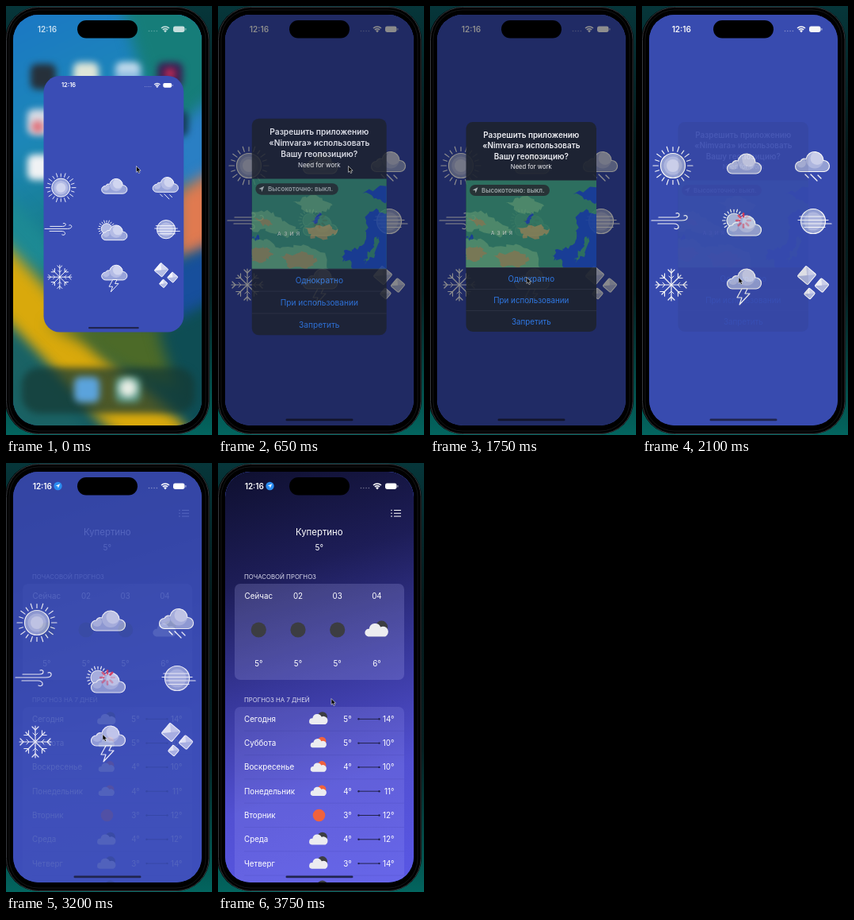
An HTML page with a canvas that plays this animation: 260 by 540 pixels, repeating every 3800 ms.

```html
<!DOCTYPE html>
<html lang="ru">
<head>
<meta charset="utf-8">
<style>
  html, body { margin: 0; width: 260px; height: 540px; overflow: hidden; background: #000; }
  canvas { display: block; }
</style>
</head>
<body>
<canvas id="stage" width="260" height="540"></canvas>
<script>
const LOOP = 3800;
const canvas = document.getElementById('stage');
const buffer = document.createElement('canvas');
buffer.width = canvas.width;
buffer.height = canvas.height;
const main = canvas.getContext('2d');
const off = buffer.getContext('2d');
let g = main;

const clamp = v => Math.min(1, Math.max(0, v));
const mix = (a, b, p) => a + (b - a) * p;
const span = (t, a, b) => clamp((t - a) / (b - a));
const smooth = p => p * p * (3 - 2 * p);
const settle = (t, start, tau) => t < start ? 0 : 1 - Math.exp((start - t) / tau);

function box(x, y, w, h, r, fill) {
  g.beginPath();
  g.roundRect(x, y, w, h, r);
  if (fill) { g.fillStyle = fill; g.fill(); }
}
function disc(x, y, r, fill, stroke, width = 1.2) {
  g.beginPath();
  g.arc(x, y, r, 0, Math.PI * 2);
  if (fill) { g.fillStyle = fill; g.fill(); }
  if (stroke) { g.strokeStyle = stroke; g.lineWidth = width; g.stroke(); }
}
function line(x1, y1, x2, y2, color = '#fff', width = 1.2) {
  g.beginPath();
  g.moveTo(x1, y1);
  g.lineTo(x2, y2);
  g.strokeStyle = color;
  g.lineWidth = width;
  g.stroke();
}
function shape(d, fill, stroke, width = 1.2) {
  const path = new Path2D(d);
  if (fill) { g.fillStyle = fill; g.fill(path); }
  if (stroke) { g.strokeStyle = stroke; g.lineWidth = width; g.stroke(path); }
}
function text(str, x, y, size, { color = '#fff', weight = 400, align = 'center' } = {}) {
  g.font = `${weight} ${size}px Inter, "Noto Sans", sans-serif`;
  g.textAlign = align;
  g.textBaseline = 'alphabetic';
  g.fillStyle = color;
  g.fillText(str, x, y + size * 0.36);
}
function at(x, y, draw, scale = 1) {
  g.save();
  g.translate(x, y);
  g.scale(scale, scale);
  draw();
  g.restore();
}
function gradient(x1, y1, x2, y2, ...colors) {
  const fill = g.createLinearGradient(x1, y1, x2, y2);
  colors.forEach((c, i) => fill.addColorStop(i / (colors.length - 1), c));
  return fill;
}
// Draws a group on its own surface, then blends it as one.
function layer(alpha, draw) {
  if (alpha < 0.004) return;
  off.clearRect(0, 0, 260, 540);
  g = off;
  draw();
  g = main;
  g.save();
  g.globalAlpha = alpha;
  g.drawImage(buffer, 0, 0);
  g.restore();
}

// ---- Home screen ----

function wallpaper() {
  g.save();
  g.filter = 'blur(9px)';
  box(-20, -20, 300, 590, 0, gradient(40, 0, 230, 400, '#1b78c4', '#1c87b8', '#167a80', '#0f5560'));
  shape('M140 -20H290V180H200Z', '#167d79');
  shape('M205 160L290 90V215L215 230Z', '#2a7fc4');
  shape('M215 235L290 190V300L215 320Z', '#e07a50');
  shape('M200 330L290 285V350L210 420Z', '#174f9c');
  shape('M-20 215L60 300 60 340 -20 300Z', '#1d8a94');
  shape('M-20 280Q50 350 90 400T270 560H160Q70 480 -20 375Z', '#d9a90c');
  shape('M50 400H215L250 480Q160 480 100 425Z', '#4c6a28');
  shape('M-20 385Q40 440 90 500L120 580H-20Z', '#1a6264');
  shape('M190 405L290 360V580L230 530Z', '#0e4d54');
  g.restore();

  g.save();
  g.filter = 'blur(4px)';
  const app = (x, y, fill) => box(x - 16, y - 16, 32, 32, 8, fill);
  app(47, 89, '#26303a');
  app(101, 87, '#dfe6d8');
  app(154, 87, gradient(0, 70, 0, 104, '#e8f0f4', '#3f8fd0'));
  app(207, 87, '#3a1f55');
  disc(207, 85, 7, '#c02a55');
  app(43, 146, '#d8dde6');
  disc(40, 152, 8, '#e07078');
  app(43, 203, '#f0f2f4');
  app(214, 148, '#153a58');
  box(20, 455, 218, 58, 22, 'rgba(22,58,52,.72)');
  app(102, 483, '#5ba3dc');
  app(154, 483, '#5d9a8a');
  disc(154, 481, 11, '#e6ede4');
  g.restore();
}

// ---- Sky glyphs ----

const PALE = '#d0d5f0', MID = '#98a4da', SOFT = '#b4bce5';
const CLOUD = 'M-15 13A6.5 6.5 0 0 1 -15 0A6 6 0 0 1 -8 -3A11.1 11.1 0 0 1 14 -1A7 7 0 0 1 15 13Z';

function cloud(x, y) {
  at(x, y, () => {
    shape(CLOUD, MID);
    g.save();
    g.clip(new Path2D(CLOUD));
    disc(3, -2, 11, SOFT);
    disc(6, -4, 8.5, PALE);
    disc(-14, 2, 6, SOFT);
    g.restore();
    shape(CLOUD, null, '#fff');
  });
}
function rays(x, y, inner, outer, count) {
  for (let i = 0; i < count; i++) {
    const a = i / count * Math.PI * 2, r = i % 2 ? outer - (outer - inner) * 0.25 : outer;
    line(x + Math.cos(a) * inner, y + Math.sin(a) * inner, x + Math.cos(a) * r, y + Math.sin(a) * r);
  }
}
function gem(x, y, r) {
  at(x, y, () => {
    g.rotate(Math.PI / 4 - 0.08);
    const s = r * 1.36;
    box(-s / 2, -s / 2, s, s, 1.6, PALE);
    shape(`M${-s / 2} ${s / 2}L${s / 2} ${-s / 2}V${s / 2}Z`, SOFT);
    shape(`M${-s / 2} ${-s / 2}L0 0L${-s / 2} ${s / 2}Z`, '#f4f5fc');
    box(-s / 2, -s / 2, s, s, 1.6);
    g.strokeStyle = '#fff';
    g.lineWidth = 1;
    g.stroke();
  });
}
function snowflake(x, y) {
  for (let i = 0; i < 8; i++) {
    at(x, y, () => {
      g.rotate(i * Math.PI / 4);
      const r = i % 2 ? 17 : 20;
      line(0, 0, r, 0);
      shape(`M${r - 1} -4L${r - 5} 0L${r - 1} 4`, null, '#fff');
      if (i % 2 === 0) shape('M11 -3L8 0L11 3', null, '#fff', 1);
    });
  }
}
function glyphs() {
  g.lineCap = g.lineJoin = 'round';
  rays(39, 201, 18.5, 25, 20);
  disc(39, 201, 15.5, MID, '#fff');
  disc(39, 201, 11.5, SOFT);
  disc(39, 201, 8, PALE);

  cloud(129, 198);
  cloud(215, 195.5);
  line(206, 212, 210, 216);
  line(213, 212, 221, 220);
  line(222, 213, 226, 217);

  shape('M12 270H50C60 270 58 262 53 264', null, '#fff');
  shape('M21 266H42C49 266 48 259 43 261', null, '#fff');
  shape('M20 274H40C49 274 47 283 41 280', null, '#fff');

  rays(116, 270, 11, 14.5, 20);
  disc(116, 270, 9, SOFT, '#fff');
  cloud(129, 276);

  disc(216, 271, 15.5, MID, '#fff');
  disc(216, 271, 11.5, SOFT);
  line(199, 265, 230, 265);
  line(197, 269.5, 235, 269.5);
  line(202, 274, 239, 274);
  line(205, 278.5, 231, 278.5);

  snowflake(37, 351);
  cloud(129, 343);
  shape('M126 356L120 367H126L123 376L136 362H130L133 356Z', '#3a4db5', '#fff');

  gem(208, 339, 12.5);
  gem(227, 351.5, 9.5);
  gem(211.5, 362, 7.5);
}
function spinner(t) {
  const head = t / 1000 * 8;
  for (let i = 0; i < 8; i++) {
    const age = (((head - i) % 8) + 8) % 8;
    const a = i * Math.PI / 4 - Math.PI / 2;
    line(128 + Math.cos(a) * 5, 270 + Math.sin(a) * 5, 128 + Math.cos(a) * 8.8, 270 + Math.sin(a) * 8.8,
      `rgba(232,56,84,${1 - age * 0.1})`, 2.6);
  }
}

// ---- System chrome ----

function status(t) {
  const shift = smooth(span(t, 2000, 2250));
  text('12:16', mix(52, 45.8, shift), 29, 10, { weight: 600 });
  const pin = smooth(span(t, 2100, 2300));
  if (pin) {
    g.save();
    g.globalAlpha *= pin;
    disc(65.5, 29, 5.2, '#2a8cf0');
    shape('M68.2 26.3L62.8 28.8L65.3 29.2L65.8 31.8Z', '#fff');
    g.restore();
  }
  for (let i = 0; i < 4; i++) disc(180.5 + i * 3.3, 31.5, 0.8, 'rgba(255,255,255,.4)');
  g.lineCap = 'butt';
  for (const r of [7, 4.4]) {
    g.beginPath();
    g.arc(201, 33, r, -Math.PI * 0.75, -Math.PI * 0.25);
    g.strokeStyle = '#fff';
    g.lineWidth = 1.6;
    g.stroke();
  }
  shape('M201 33.5L199 31Q201 29.6 203 31Z', '#fff');
  box(211, 25.5, 14.5, 7.5, 2.4, '#fff');
  box(226.3, 28, 1.2, 2.6, 0.6, 'rgba(255,255,255,.6)');
}
function device() {
  g.fillStyle = gradient(0, 0, 0, 540, '#06363a', '#04191b', '#052022', '#03655f');
  g.fillRect(0, 0, 260, 540);
  box(-1, 1, 258, 538, 42, '#000');
  box(0.5, 1.5, 255.5, 537, 41);
  g.strokeStyle = '#35383d';
  g.lineWidth = 1;
  g.stroke();
  box(4, 5, 248, 530, 37);
  g.strokeStyle = '#141517';
  g.stroke();
}
function cursor(t) {
  const stops = [[0, 164.5, 201.5], [680, 164.5, 201.5], [1100, 146, 341], [1225, 112, 341],
    [1350, 122, 341.5], [3350, 122, 341.5], [3700, 143, 296.5], [LOOP, 143, 296.5]];
  const i = stops.findIndex(s => s[0] > t);
  const [t0, x0, y0] = stops[i - 1], [t1, x1, y1] = stops[i];
  const p = smooth(span(t, t0, t1));
  at(mix(x0, x1, p), mix(y0, y1, p), () =>
    shape('M0 0V7.8L1.8 6.2L3 9L4.5 8.3L3.3 5.7H5.6Z', '#000', 'rgba(255,255,255,.8)', 0.7));
}

// ---- Permission alert ----

function coast(points, fill, seed) {
  const random = () => (seed = seed * 16807 % 2147483647) / 2147483647 - 0.5;
  g.beginPath();
  points.forEach(([x, y], i) => {
    const [nx, ny] = points[(i + 1) % points.length];
    for (let k = 0; k < 6; k++) g.lineTo(mix(x, nx, k / 6) + random() * 5, mix(y, ny, k / 6) + random() * 5);
  });
  g.closePath();
  g.fillStyle = fill;
  g.fill();
}
function map() {
  const sea = '#193f9b', sand = '#817f55', light = '#52906b';
  g.save();
  g.beginPath();
  g.rect(45.5, 219.5, 164.5, 109.5);
  g.clip();
  g.fillStyle = '#2f765f';
  g.fillRect(45, 219, 166, 111);
  coast([[40, 262], [66, 258], [84, 270], [104, 282], [86, 290], [60, 280], [42, 284]], light, 11);
  coast([[40, 296], [62, 292], [80, 306], [108, 300], [136, 312], [140, 335], [40, 335]], light, 23);
  coast([[98, 246], [122, 240], [145, 252], [130, 262], [108, 258]], light, 37);
  coast([[44, 306], [60, 302], [72, 312], [60, 320], [46, 320]], sand, 5);
  coast([[82, 314], [104, 308], [126, 318], [116, 328], [90, 327]], sand, 19);
  coast([[112, 280], [138, 275], [152, 284], [136, 292], [118, 290]], sand, 71);
  coast([[50, 268], [60, 266], [70, 274], [58, 277]], sand, 47);
  coast([[183, 236], [215, 226], [215, 250], [200, 244]], sea, 59);
  coast([[186, 264], [198, 256], [215, 268], [215, 335], [166, 335], [168, 322], [154, 318], [160, 308],
    [176, 304], [186, 290]], sea, 83);
  coast([[196, 290], [202, 294], [196, 312], [184, 322], [182, 318], [192, 306]], '#2f765f', 29);
  coast([[120, 270], [127, 262], [129, 264], [122, 273]], sea, 91);
  coast([[47, 290], [53, 288], [52, 294]], sea, 13);
  'АЗИЯ'.split('').forEach((c, i) => text(c, 79 + i * 7.6, 286, 6.5, { color: '#c0cbbd', weight: 500 }));
  g.restore();
}
function alertCard() {
  box(45.5, 146, 164.5, 264, 8.5, '#1e232f');
  ['Разрешить приложению', '«Nimvara» использовать', 'Вашу геопозицию?'].forEach((s, i) =>
    text(s, 127.8, 162.3 + i * 13.4, 9.9, { weight: 600 }));
  text('Need for work', 127.8, 202.5, 7.7);
  map();
  box(50, 225, 101, 14, 7, '#293532');
  shape('M60.5 228.3L53.8 231.6L57 232.2L57.6 235.4Z', '#b6bebb');
  text('Высокоточно: выкл.', 65, 232, 7.9, { weight: 600, color: '#aab3b0', align: 'left' });
  ['Однократно', 'При использовании', 'Запретить'].forEach((s, i) => {
    line(45.5, 329.5 + i * 27, 210, 329.5 + i * 27, '#363b48', 0.6);
    text(s, 127.8, 343 + i * 27, 9.8, { color: '#317fee' });
  });
}

// ---- Forecast ----

const NIGHT = '#3c3d42', SUN = '#f0623d';

function miniCloud(x, y, behind, scale) {
  at(x, y, () => {
    disc(5, -3, 6.5, behind);
    shape('M-9 7A4 4 0 0 1 -8 -1A6.3 6.3 0 0 1 4 -3A5 5 0 0 1 9 7Z', '#ececf0');
  }, scale);
}
function forecast() {
  box(9, 11, 238, 517, 0, gradient(50, 0, 210, 530, '#0f1030', '#1d1d57', '#37379a', '#5250d2', '#5957e4'));
  for (let i = 0; i < 3; i++) {
    const y = 59.5 + i * 3.8;
    disc(219, y, 0.8, '#fff');
    line(222, y, 231, y, '#fff', 1);
  }
  text('Купертино', 127.8, 87, 11.4);
  text('5°', 127.8, 106, 10);
  const label = { color: '#dcdcee', align: 'left' };
  text('ПОЧАСОВОЙ ПРОГНОЗ', 33, 143, 7.8, label);
  text('ПРОГНОЗ НА 7 ДНЕЙ', 33, 298, 7.8, label);

  box(21, 152, 214, 121, 7, 'rgba(190,190,255,.2)');
  [['Сейчас', 5], ['02', 5], ['03', 5], ['04', 6]].forEach(([hour, temp], i) => {
    const x = 51.3 + i * 49.7;
    text(hour, x, 167.5, 9.8);
    if (i < 3) disc(x, 210, 9.6, NIGHT);
    else miniCloud(x, 210, NIGHT, 1.2);
    text(temp + '°', x, 252, 9.8);
  });

  box(21, 307, 214, 260, 7, 'rgba(170,170,255,.17)');
  const days = [['Сегодня', 5, 14, NIGHT], ['Суббота', 5, 10, SUN], ['Воскресенье', 4, 10, SUN],
    ['Понедельник', 4, 11, SUN], ['Вторник', 3, 12, 'clear'], ['Среда', 4, 12, NIGHT],
    ['Четверг', 3, 14, NIGHT]];
  days.forEach(([day, low, high, sky], i) => {
    const y = 322.3 + i * 30.3;
    text(day, 33, y, 9.8, { align: 'left' });
    if (sky === 'clear') disc(127.5, y, 7.8, SUN);
    else miniCloud(127, y, sky, sky === SUN ? 0.82 : 0.95);
    text(low + '°', 163.5, y, 9.8);
    line(177.5, y, 203.5, y, '#22224c', 1);
    disc(177.5, y, 1.2, '#22224c');
    disc(203.5, y, 1.2, '#22224c');
    text(high + '°', 222.5, y, 9.8, { align: 'right' });
    line(33, y + 15, 235, y + 15, 'rgba(30,30,110,.2)', 0.5);
  });
  miniCloud(127, 534.5, NIGHT, 0.95);
}

// ---- Scene ----

function appWindow(t) {
  const p = t > 500 ? 1 : 1 - Math.exp(-t / 80);
  const left = mix(48, 9, p), right = mix(224, 247, p), top = mix(89, 11, p), bottom = mix(409, 528, p);
  const s = mix(0.747, 1, p);
  const scaled = draw => at(mix(136, 127.8, p), mix(229, 201, p), () => {
    g.translate(-127.8, -201);
    draw();
  }, s);
  g.save();
  box(left, top, right - left, bottom - top, mix(20, 32, p), '#3a4db5');
  g.clip();
  scaled(() => {
    glyphs();
    if (t > 150) spinner(t);
  });
  layer(smooth(span(t, 3100, 3550)), forecast);
  scaled(() => status(t));
  box((left + right) / 2 - 42.5 * s, bottom - 8.5 * s, 85 * s, 2.8 * s, 1.4 * s, '#20254f');
  g.restore();
}
function render(t) {
  g = main;
  device();
  g.save();
  box(9, 11, 238, 517, 32, '#3a4db5');
  g.clip();
  if (t < 500) {
    wallpaper();
    g.save();
    g.globalAlpha = 0.75;
    status(0);
    g.restore();
  }
  appWindow(t);

  const shown = settle(t, 520, 75);
  const alpha = t < 1740 ? shown : t < 2350 ? Math.exp((1740 - t) / 135) : 0;
  g.fillStyle = `rgba(0,0,0,${0.48 * (t < 1740 ? settle(t, 520, 45) : alpha)})`;
  g.fillRect(0, 0, 260, 540);
  layer(alpha, () => at(127.8, 278, () => {
    g.translate(-127.8, -278);
    alertCard();
  }, mix(1.19, 1, shown)));
  g.restore();

  box(90, 18, 76, 22.5, 11.2, '#000');
  cursor(t);
}

const began = performance.now();
function tick() {
  render((performance.now() - began) % LOOP);
  requestAnimationFrame(tick);
}
tick();
</script>
</body>
</html>
```
